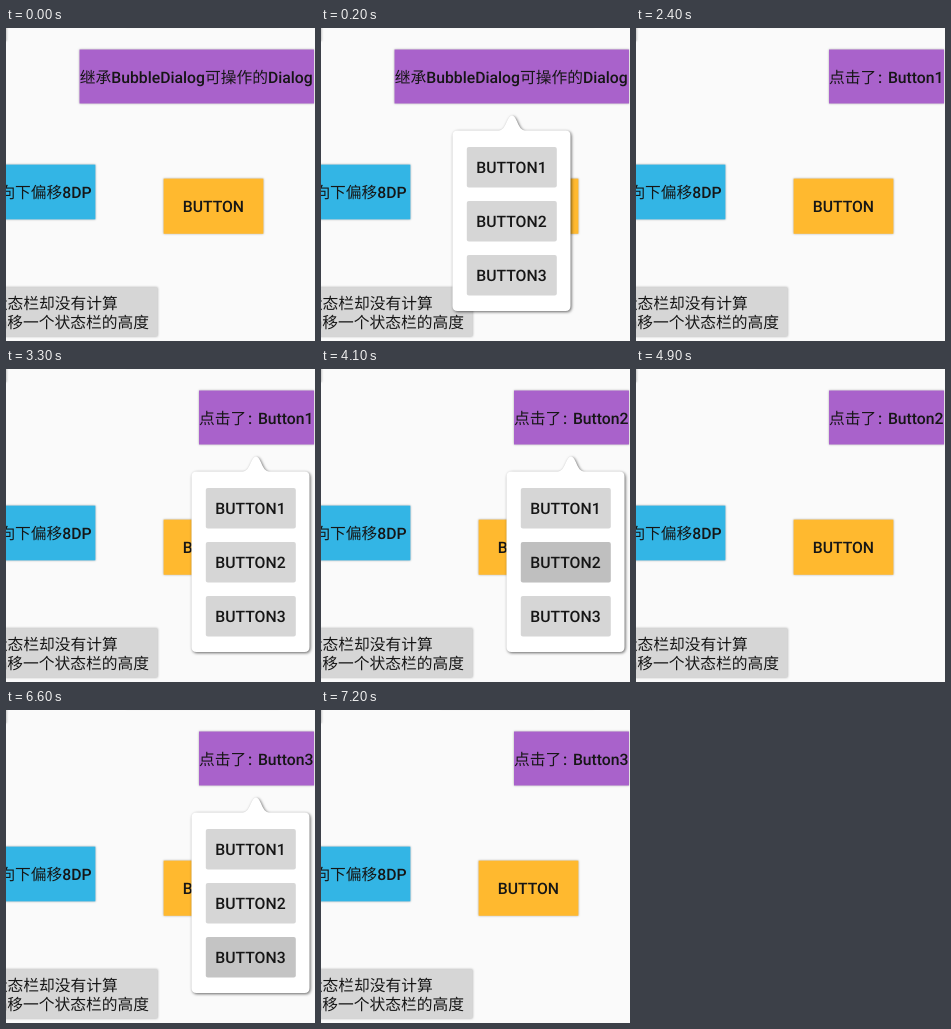
Write an HTML page that moves like this. It is 309 by 313 pixels and loops after 7.4 s.

```html
<!DOCTYPE html>
<html lang="zh-CN">
<head>
<meta charset="utf-8">
<style>
  html, body { margin: 0; width: 100%; height: 100%; overflow: hidden; background: #fafafa; }
  svg { display: block; width: 309px; height: 313px; }
  text { font: 500 15.75px Roboto, "Noto Sans CJK SC", "Noto Sans CJK", sans-serif; fill: #161616; white-space: pre; text-rendering: geometricPrecision; }
  .cjk { font-weight: 400; }
  .raised { filter: drop-shadow(0 .7px 1px rgba(0, 0, 0, .3)); }
  .bubble { filter: drop-shadow(1px 1px 1.5px rgba(0, 0, 0, .6)); }
</style>
</head>
<body>
<svg viewBox="0 0 309 313">
  <rect width="309" height="313" fill="#fafafa"/>
  <rect class="raised" x="-20" y="-20" width="20.5" height="33" fill="#d6d6d6"/>
  <rect class="raised" x="120" y="-20" width="153" height="18.5" fill="#d6d6d6"/>

  <rect id="header" class="raised" y="21.5" height="54" fill="#a962cb"/>
  <text id="intro" x="73.8" y="54.5"><tspan class="cjk">继承</tspan>BubbleDialog<tspan class="cjk">可操作的</tspan>Dialog</text>
  <g id="result">
    <text class="cjk" x="193" y="54.5">点击了</text>
    <text x="242" y="54.5">:</text>
    <text id="clicked" x="251.9" y="54.5"></text>
  </g>

  <rect class="raised" x="-20" y="136.6" width="109.4" height="54.8" fill="#33b5e5"/>
  <text x="85.7" y="170" text-anchor="end"><tspan class="cjk">向下偏移</tspan>8DP</text>

  <rect class="raised" x="157.6" y="150.6" width="99.8" height="55.2" fill="#ffb92f"/>
  <text x="207.4" y="184" text-anchor="middle">BUTTON</text>

  <rect class="raised" x="-20" y="259.3" width="171.7" height="49.3" rx="1" fill="#d6d6d6"/>
  <text class="cjk" x="111.8" y="281" text-anchor="end">状态栏却没有计算</text>
  <text class="cjk" x="143" y="299.5" text-anchor="end">偏移一个状态栏的高度</text>

  <g id="dialog">
    <path id="bubble" class="bubble" fill="#fff"/>
    <g id="buttons"></g>
  </g>
</svg>
<script>
const LOOP = 7400, STEP = 100;
const ROUNDS = [
  { open: 100, press: 1600, close: 2400, left: 131.5, tip: 191 },
  { open: 3200, press: 3900, close: 4700, left: 185.5, tip: 250 },
  { open: 5600, press: 6200, close: 7000, left: 185.5, tip: 250 }
];
const $ = id => document.getElementById(id);
const clamp = v => Math.max(0, Math.min(1, v));

$('buttons').innerHTML = ROUNDS.map((_, i) => {
  const y = 119 + 54 * i;
  const box = `x="14.3" y="${y}" width="90" height="40.5" rx="2"`;
  return `<clipPath id="clip${i}"><rect ${box}/></clipPath>
    <rect ${box} fill="#d6d6d6"/>
    <circle id="ripple${i}" clip-path="url(#clip${i})" cx="75.5" cy="${y + 20}"/>
    <text x="59" y="${y + 26}" text-anchor="middle">BUTTON${i + 1}</text>`;
}).join('');

function bubblePath(left, tip) {
  const top = 102.5, right = left + 118, bottom = 283, r = 5;
  return `M${left + r} ${top}H${tip - 13}
    C${tip - 6} ${top} ${tip - 5} 87.5 ${tip} 87.5
    S${tip + 6} ${top} ${tip + 13} ${top}
    H${right - r}q${r} 0 ${r} ${r}V${bottom - r}q0 ${r} ${-r} ${r}
    H${left + r}q${-r} 0 ${-r} ${-r}V${top + r}q0 ${-r} ${r} ${-r}z`;
}

function drawRipple(i, age) {
  const grow = clamp(age / 200), fade = 1 - clamp((age - 300) / 400);
  $('ripple' + i).setAttribute('r', 11 + 70 * grow);
  $('ripple' + i).setAttribute('opacity', age < 0 ? 0 : (0.05 + 0.06 * grow) * fade);
}

function render(time) {
  const t = Math.floor((time % LOOP) / STEP) * STEP;
  const presses = ROUNDS.filter(round => t >= round.press).length;
  const x = presses ? 193 : 73.5;
  $('header').setAttribute('x', x);
  $('header').setAttribute('width', 308 - x);
  $('intro').style.display = presses ? 'none' : '';
  $('result').style.display = presses ? '' : 'none';
  $('clicked').textContent = 'Button' + presses;

  const current = ROUNDS.find(round => t >= round.open && t < round.close);
  $('dialog').style.display = current ? '' : 'none';
  if (current) {
    $('bubble').setAttribute('d', bubblePath(current.left, current.tip));
    $('buttons').setAttribute('transform', `translate(${current.left})`);
    ROUNDS.forEach((round, i) => drawRipple(i, round === current ? t - round.press : -1));
  }
}

let start;
function tick(now) {
  start ??= now;
  render(now - start);
  requestAnimationFrame(tick);
}
render(0);
requestAnimationFrame(tick);
</script>
</body>
</html>
```
